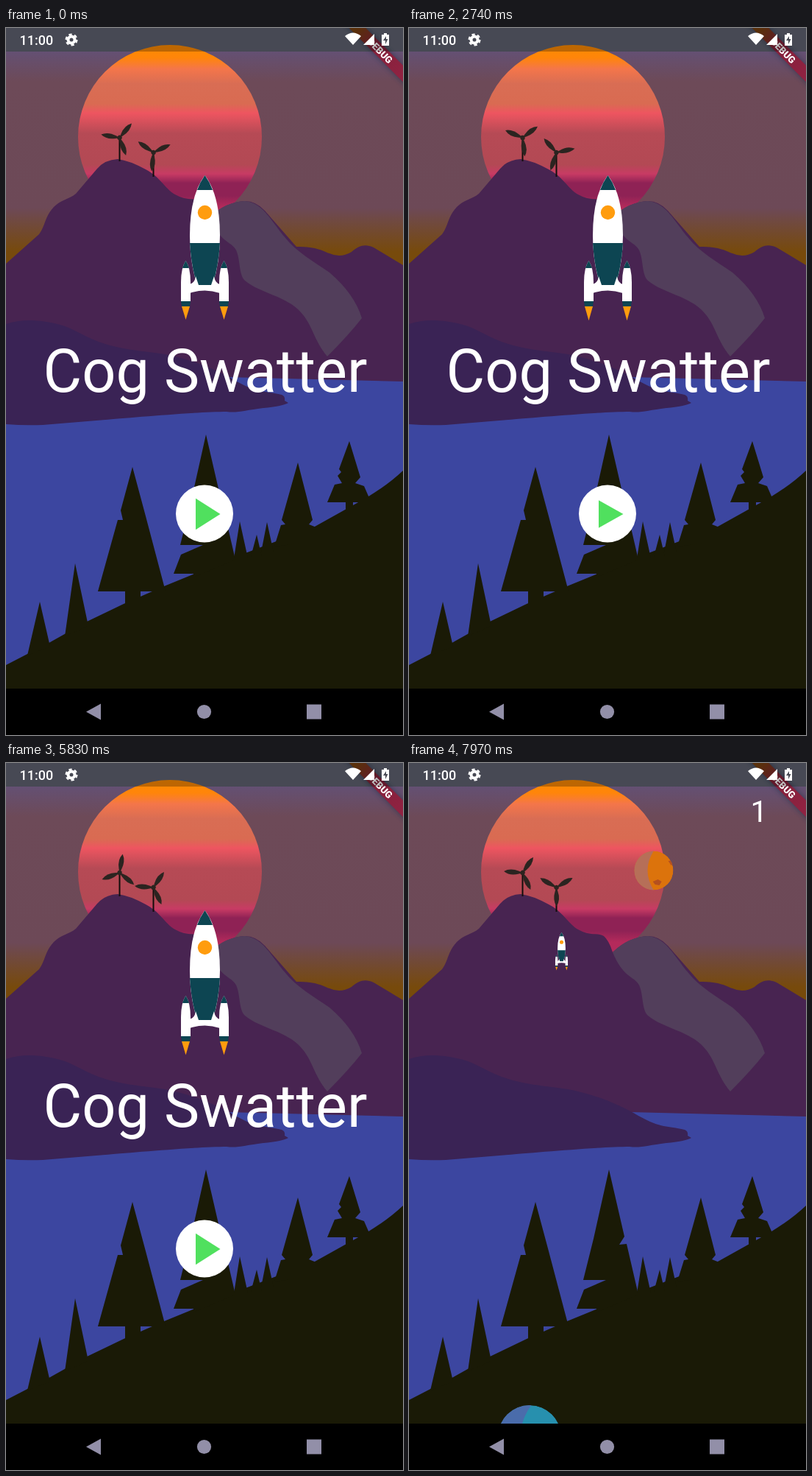
Animation of 540 by 960 pixels, one loop 8 s. Source, as an HTML page:

```html
<!DOCTYPE html>
<html lang="en">
<head>
<meta charset="utf-8">
<title>Cog Swatter</title>
<style>
html, body { margin: 0; width: 100%; height: 100%; overflow: hidden; background: #000; }
svg { display: block; width: 540px; height: 960px; }
text { font-family: Roboto, sans-serif; fill: #fff; }
</style>
</head>
<body>
<svg viewBox="0 0 540 960">
  <defs>
    <linearGradient id="sun" gradientUnits="userSpaceOnUse" x1="0" y1="23" x2="0" y2="273">
      <stop offset="0" stop-color="#ff8c00"/>
      <stop offset=".07" stop-color="#ff850a"/>
      <stop offset=".13" stop-color="#f4764a"/>
      <stop offset=".21" stop-color="#d96d54"/>
      <stop offset=".32" stop-color="#d96b52"/>
      <stop offset=".37" stop-color="#ee5560"/>
      <stop offset=".48" stop-color="#b64a55"/>
      <stop offset=".65" stop-color="#b34954"/>
      <stop offset=".7" stop-color="#c83b64"/>
      <stop offset=".75" stop-color="#8f2255"/>
      <stop offset=".82" stop-color="#8f2255"/>
      <stop offset=".88" stop-color="#b42a5b"/>
    </linearGradient>
    <linearGradient id="sky" gradientUnits="userSpaceOnUse" x1="0" y1="0" x2="0" y2="330">
      <stop offset="0" stop-color="#606371"/>
      <stop offset=".097" stop-color="#606371"/>
      <stop offset=".097" stop-color="#645073"/>
      <stop offset=".22" stop-color="#6d4a58"/>
      <stop offset=".74" stop-color="#6d4957"/>
      <stop offset=".92" stop-color="#774a0c"/>
      <stop offset="1" stop-color="#774a08"/>
    </linearGradient>
    <linearGradient id="ribbon">
      <stop offset=".2" stop-color="#78400f"/>
      <stop offset=".42" stop-color="#84203a"/>
      <stop offset="1" stop-color="#952345"/>
    </linearGradient>
    <filter id="soft" x="-20%" y="-80%" width="140%" height="260%"><feGaussianBlur stdDeviation="3"/></filter>
    <clipPath id="stageClip"><rect width="540" height="897"/></clipPath>
    <clipPath id="meteorClip"><circle r="26.5"/></clipPath>
    <clipPath id="planetClip"><circle r="43"/></clipPath>
    <g id="blades" fill="#2b2420">
      <path id="blade" d="M0 0L-1.800-5Q-6-17 0-25.500Q5.500-17 1.800-5Z"/>
      <use href="#blade" transform="rotate(120)"/>
      <use href="#blade" transform="rotate(240)"/>
      <circle r="3.200"/>
    </g>
    <g id="booster">
      <path d="M238 371V345Q238 326 244.500 316Q251 326 251 345V371Z" fill="#fff"/>
      <path d="M240 326Q242 320 244.500 316Q247 320 249 326ZM238 371H251L250 378H239Z" fill="#0d4552"/>
      <path id="flame" fill="#ff9c0e"/>
    </g>
    <g id="rocket">
      <use href="#booster"/>
      <use href="#booster" x="52"/>
      <path d="M270.500 200Q291 227 291 282Q291 318 281 349H260Q250 318 250 282Q250 227 270.500 200Z" fill="#fff"/>
      <path d="M270.500 200Q277 209 281 220H260Q264 209 270.500 200ZM250 292H291Q289 324 281 349H260Q252 324 250 292Z" fill="#0d4552"/>
      <path d="M250 348Q257 346 258 337L262 349H279L283 337Q284 346 291 348V360Q270.500 353 250 360Z" fill="#fff"/>
      <circle cx="270.500" cy="250.500" r="9.700" fill="#ff9c0e"/>
    </g>
  </defs>

  <!-- landscape -->
  <rect width="540" height="330" fill="url(#sky)"/>
  <circle cx="223" cy="148" r="125" fill="url(#sun)"/>
  <rect y="470" width="540" height="427" fill="#3c46a0"/>
  <path d="M0 320L45 280C54 268 52 257 65 243C75 233 85 233 95 225L124 191Q134 179 152 178Q168 180 190 192C210 202 218 221 232 227C246 235 256 230 265 235Q272 241 277 257Q300 236 325 235Q340 235 352 248L395 297C425 297 430 303 440 306Q455 313 470 304C480 295 489 293 500 298L540 322V480L300 474H0Z" fill="#482451"/>
  <path d="M277 257Q298 236 325 235C350 237 360 262 380 285C395 304 420 318 440 332Q474 361 484 394Q466 417 437 446C418 423 417 403 401 386C382 364 345 360 325 343C316 335 319 310 312 300C306 290 291 291 277 257Z" fill="#523e5b"/>
  <path d="M0 402C22 394 50 397 70 402C92 407 110 422 135 429C170 440 205 439 230 446C263 454 290 466 312 479C345 497 350 492 375 498Q380 500 379 506L384 509Q375 514 350 516C325 519 315 523 300 521C260 521 160 530 135 532L50 539Q25 540 0 538Z" fill="#3a2355"/>
  <g fill="#1a1a06">
    <path d="M0 865L60 834L110 806L160 782L215 758L310 719L420 677L490 638Q520 620 540 601V897H0Z"/>
    <path d="M46 779L60 840L29 852ZM94 727L112 812L80 826Z"/>
    <path d="M172 596L190 663L217 765H183V785H162V765H125L152 668H159L156 655Z"/>
    <path d="M272 552L293 643L286 654L296 653L312 722L255 746V741H228L238 715L268 702H237L251 646Z"/>
    <path d="M318 670L329 720H310ZM341 688L348 718H333ZM355 671L364 712H347Z"/>
    <path d="M397 590L417 668L412 674L422 678L400 700L365 704L374 675L380 674L375 668Z"/>
    <path d="M467 561L482 610L475 618L487 622L494 638L488 644H472V658H462V644H437L447 620L457 618L451 608L456 603L453 599Z"/>
  </g>
  <path d="M154.500 149V181M200.500 169V202" stroke="#120d0b" stroke-width="2"/>
  <use href="#blades" id="turbineA"/>
  <use href="#blades" id="turbineB"/>

  <g id="menu">
    <use href="#rocket"/>
    <text x="271" y="494" font-size="81" text-anchor="middle">Cog Swatter</text>
    <circle cx="270" cy="659.500" r="39" fill="#fff"/>
    <path id="play" fill="#50e05e"/>
  </g>

  <g id="game" clip-path="url(#stageClip)">
    <g id="meteor">
      <g clip-path="url(#meteorClip)">
        <circle r="26.500" fill="#dc730c"/>
        <path d="M0-27Q-17 0 0 27H-27V-27Z" fill="#b66f58"/>
        <g id="craters" fill="#b5501f">
          <path id="spots" d="M8 15L15 12L20 15L17 20L11 19ZM-26-13L-21-14L-17-10L-22-7Z"/>
          <use href="#spots" x="55"/>
          <use href="#spots" x="-55"/>
        </g>
      </g>
    </g>
    <g id="planet">
      <g clip-path="url(#planetClip)">
        <circle r="43" fill="#2790ae"/>
        <path d="M3-44Q-7-30-10-18V44H-44V-44Z" fill="#4a6cab"/>
        <ellipse id="land" cy="-18" rx="6" ry="6" fill="#4b9a66"/>
      </g>
    </g>
    <use href="#rocket" id="shot"/>
    <text x="476" y="80" font-size="41" text-anchor="middle">1</text>
  </g>

  <g transform="translate(509 31) rotate(45)">
    <rect x="-70" y="-9" width="140" height="18" fill="#2c3450" opacity=".65" filter="url(#soft)"/>
    <rect x="-70" y="-8" width="140" height="16" fill="url(#ribbon)"/>
    <text y="4.700" font-size="13" font-weight="900" text-anchor="middle">DEBUG</text>
  </g>

  <!-- system bars -->
  <rect width="540" height="32" opacity=".26"/>
  <text x="18.500" y="23" font-size="18" font-weight="500">11:00</text>
  <g fill="none" stroke="#fff">
    <circle cx="89" cy="16" r="4.500" stroke-width="4"/>
    <circle cx="89" cy="16" r="7.300" stroke-width="2.500" stroke-dasharray="4.200 3.445"/>
  </g>
  <path d="M461 11Q472 2 483 11L472 23ZM486 23L501 8V23ZM511 9H514V7H518V9H521V24H511Z" fill="#fff"/>
  <path d="M517 11L513 17H516V22L519.500 15H517Z" fill="#484a54"/>
  <rect y="897" width="540" height="63"/>
  <g fill="#928fa8">
    <path d="M109 928.500L129 917.500V939.500ZM409 918.500H429V938.500H409Z"/>
    <circle cx="269.500" cy="928.500" r="9.600"/>
  </g>
</svg>
<script>
const LOOP = 8, GAME_START = 5.95, SHOT_START = 6.56, TAU = 2 * Math.PI;
const $ = id => document.getElementById(id);
const set = (id, name, value) => $(id).setAttribute(name, value);
const show = (id, on) => { $(id).style.display = on ? '' : 'none'; };

function draw(t) {
  const spin = 180 * t;
  set('turbineA', 'transform', `translate(154.5 149) rotate(${40 + spin})`);
  set('turbineB', 'transform', `translate(200.5 169) rotate(${65 + spin})`);

  const flameTip = 397.2 - 1.2 * Math.cos(TAU * t);
  set('flame', 'd', `M239 378H250L244.5 ${flameTip}Z`);

  const half = 20 + 1.3 * Math.cos(Math.PI * (t - 1.85));
  set('play', 'd', `M258 ${660 - half}L291.5 660L258 ${660 + half}Z`);

  const playing = t >= GAME_START;
  show('menu', !playing);
  show('game', playing);
  show('shot', t >= SHOT_START);

  const dt = t - 6.63;
  set('meteor', 'transform', `translate(333 ${28 + 88 * dt})`);
  set('craters', 'transform', `translate(${-7 * dt} 0)`);
  set('planet', 'transform', `translate(${215 - 38 * dt} 915)`);
  set('land', 'cx', -36 - 10 * dt);
  set('shot', 'transform', `translate(207.5 ${816 - 437 * dt}) scale(.263) translate(-270.5 -200)`);
}

const start = performance.now();
function tick() {
  draw((performance.now() - start) / 1000 % LOOP);
  requestAnimationFrame(tick);
}
tick();
</script>
</body>
</html>
```
